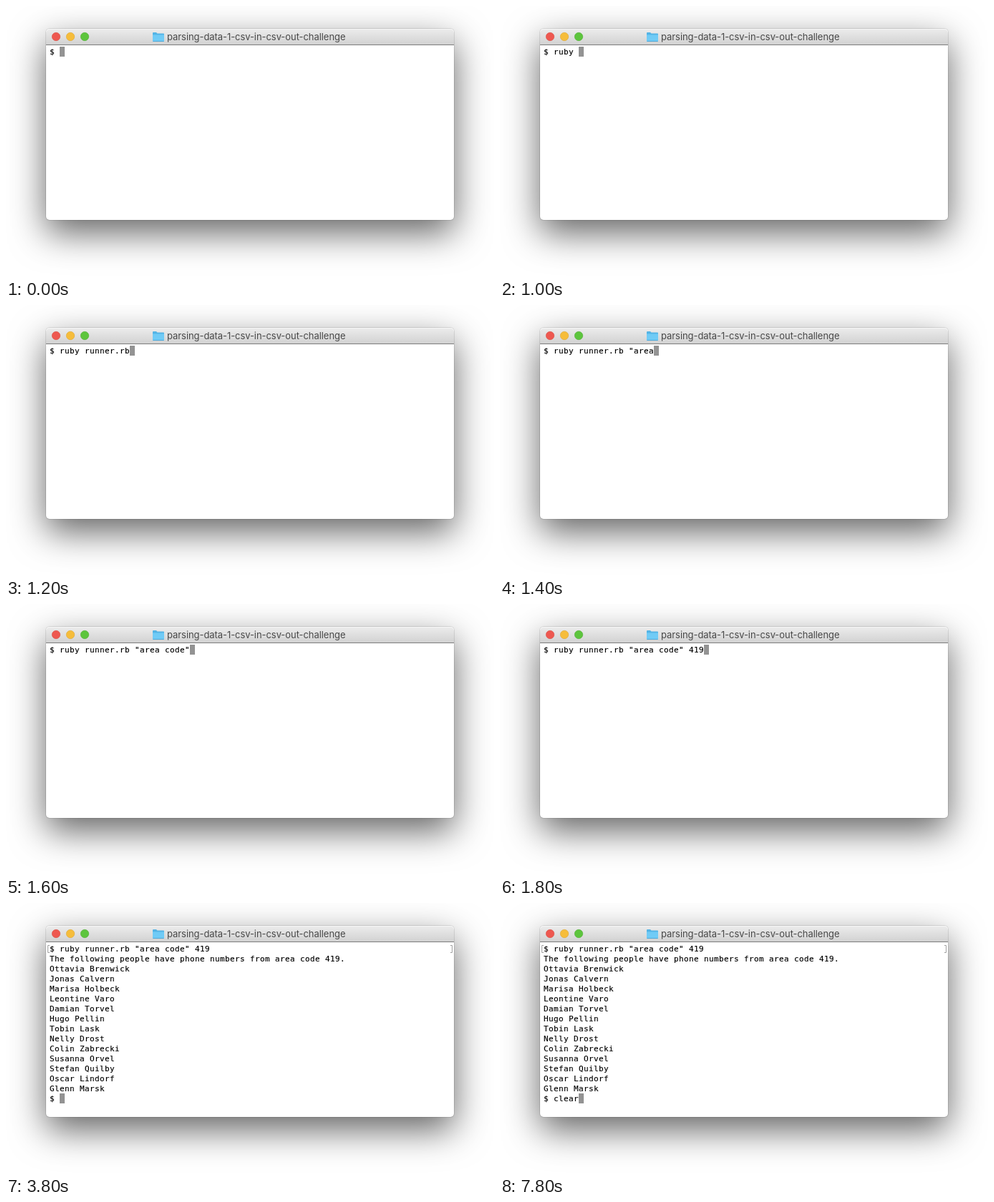
An HTML page for the animation above (8 s loop, 682 px wide and 380 px high).

```html
<!DOCTYPE html>
<html lang="en">
<head>
<meta charset="utf-8">
<title>Terminal</title>
<style>
  html, body { margin: 0; width: 100%; height: 100%; overflow: hidden; background: #fff; }
  .window {
    position: absolute; left: 56px; top: 32px; width: 570px; height: 268px;
    border-radius: 5px; background: #fff;
    box-shadow: 0 0 0 1px rgba(0,0,0,.1), 0 18px 50px rgba(0,0,0,.61);
  }
  .bar {
    position: absolute; left: 0; top: 0; width: 100%; height: 22px;
    border-bottom: 1px solid #7c7c7c; border-radius: 5px 5px 0 0;
    background: linear-gradient(#ececec, #d2d2d2);
    box-shadow: inset 0 1px #f6f6f6;
  }
  .bar svg { position: absolute; left: 0; top: 0; }
  .title { font: 13px Inter, "Open Sans", sans-serif; letter-spacing: -.065px; fill: #484848; }

  .screen {
    --cell: 7px;
    position: absolute; left: 5px; top: 26px; margin: 0;
    font: 11px/14px "DejaVu Sans Mono", "Liberation Mono", monospace;
    letter-spacing: calc(var(--cell) - 1ch);
    -webkit-text-stroke: .15px #000;
    color: #000; white-space: pre;
  }
  .screen div { height: 14px; }
  .typed { display: inline-block; height: 14px; overflow: hidden; vertical-align: top; }
  .cursor {
    position: relative; top: -1px;
    display: inline-block; width: var(--cell); height: 14px;
    background: #939393; vertical-align: top;
  }
  .mark { position: absolute; left: 0; top: 0; }

  .command, .clear, .first, .output { animation: 8s step-end infinite; }
  .command { animation-name: type; }
  .clear { animation-name: clear; }
  .first { animation-name: leave; }
  .output { animation-name: appear; }

  /* widths count the typed characters */
  @keyframes type {
    0% { width: 0; }
    12.5% { width: calc(5 * var(--cell)); }
    15% { width: calc(14 * var(--cell)); }
    17.5% { width: calc(20 * var(--cell)); }
    20% { width: calc(26 * var(--cell)); }
    22.5%, 100% { width: calc(30 * var(--cell)); }
  }
  @keyframes clear {
    0% { width: 0; }
    97.5%, 100% { width: calc(5 * var(--cell)); }
  }
  @keyframes leave {
    0% { visibility: visible; }
    47.5%, 100% { visibility: hidden; }
  }
  @keyframes appear {
    0% { visibility: hidden; }
    47.5%, 100% { visibility: visible; }
  }
</style>
</head>
<body>
<div class="window">
  <div class="bar">
    <svg width="570" height="22">
      <g stroke-width=".6">
        <circle cx="14" cy="11" r="5.7" fill="#ee5850" stroke="#d9483f"/>
        <circle cx="34" cy="11" r="5.7" fill="#f6bd3b" stroke="#dda42d"/>
        <circle cx="54" cy="11" r="5.7" fill="#5dc53d" stroke="#4bab2e"/>
      </g>
      <path d="M149 6q0-1 1-1h4l1.5 1.5h8.500q1 0 1 1V17q0 1-1 1h-14q-1 0-1-1z" fill="#54b4e6"/>
      <path d="M149 8.500h16V17q0 1-1 1h-14q-1 0-1-1z" fill="#70cbf6"/>
      <path d="M149.500 17.500h15" stroke="#4ea6d6"/>
      <text class="title" x="169" y="16">parsing-data-1-csv-in-csv-out-challenge</text>
    </svg>
  </div>
  <div class="screen"><div>$ <span class="typed command">ruby runner.rb "area code" 419</span><span class="cursor first"></span></div><div class="output">The following people have phone numbers from area code 419.
Ottavia Brenwick
Jonas Calvern
Marisa Holbeck
Leontine Varo
Damian Torvel
Hugo Pellin
Tobin Lask
Nelly Drost
Colin Zabrecki
Susanna Orvel
Stefan Quilby
Oscar Lindorf
Glenn Marsk
$ <span class="typed clear">clear</span><span class="cursor"></span></div></div>
  <svg class="mark output" width="570" height="40" fill="none" stroke="#a0a0a0">
    <path d="M5 27.500h-2.500v10h2.500M565 27.500h2.500v10h-2.500"/>
  </svg>
</div>
</body>
</html>
```
